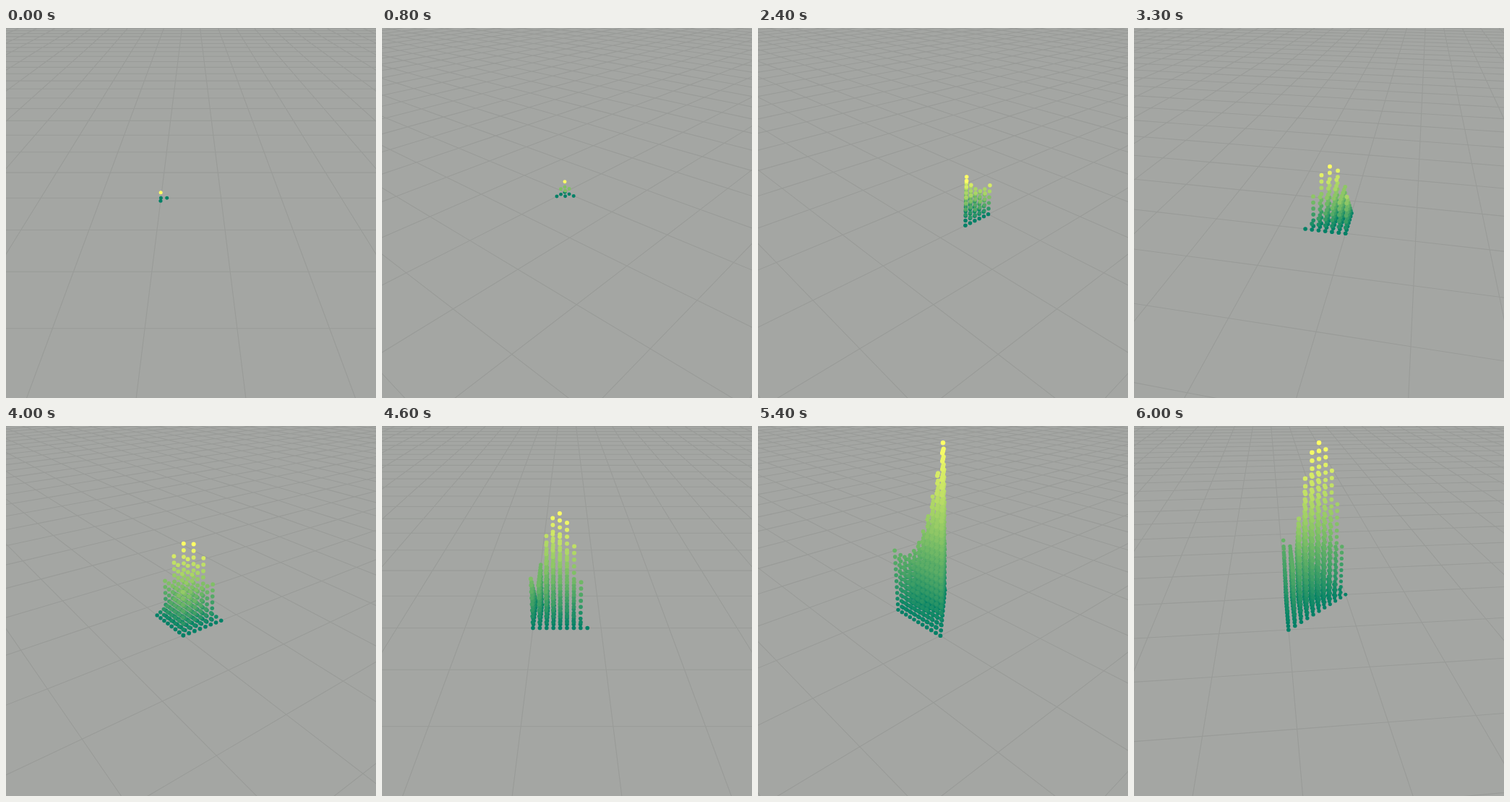
These frames come from a looping animation (512x512 px, 6.1 s). An HTML page with a canvas:

```html
<!DOCTYPE html>
<html>
<head>
<meta charset="utf-8">
<style>
  html, body { margin: 0; height: 100%; overflow: hidden; background: #a4a6a3; }
  canvas { display: block; }
</style>
</head>
<body>
<canvas id="stage" width="512" height="512"></canvas>
<script>
const ctx = document.getElementById('stage').getContext('2d');
const FOCAL = 256 / Math.tan(Math.PI / 8);  // 45 degree field of view
const DISTANCE = 7, SIN = 0.5, COS = Math.sqrt(0.75);  // camera pitched 30 degrees
const REACH = 24.5, STEP = 0.1, RADIUS = 0.03;

// Orbiting camera aimed at the centre of one grid cell.
function makeCamera(angle) {
  const c = Math.cos(angle), s = Math.sin(angle);
  return (x, y, z) => {
    const forward = y * c - x * s;
    const depth = DISTANCE + forward * COS - z * SIN;
    const scale = FOCAL / depth;
    return {
      depth, scale,
      x: 256 + (x * c + y * s) * scale,
      y: 256 - (forward * SIN + z * COS) * scale
    };
  };
}

function drawGrid(project) {
  const line = pointAt => {
    let open = false;
    for (let v = -REACH; v <= REACH; v++) {
      const p = pointAt(v);
      if (p.depth < 0.5) { open = false; continue; }
      if (open) ctx.lineTo(p.x, p.y); else ctx.moveTo(p.x, p.y);
      open = true;
    }
  };
  ctx.beginPath();
  for (let u = -REACH; u <= REACH; u++) {
    line(v => project(u, v, 0));
    line(v => project(v, u, 0));
  }
  ctx.strokeStyle = '#999b98';
  ctx.lineWidth = 1.1;
  ctx.stroke();
}

// Elements (i, j, k) that words of up to n letters reach in the Heisenberg monoid.
function drawBall(project, n) {
  const peak = Math.max(n, Math.floor(n * n / 4));
  const dots = [];
  for (let i = 0; i <= n; i++)
    for (let j = 0; i + j <= n; j++)
      for (let k = 0; k <= i * j + n - i - j; k++)
        dots.push({ ...project(i * STEP - 0.5, 0.5 - j * STEP, k * STEP), level: k / peak });
  dots.sort((a, b) => b.depth - a.depth);
  for (const d of dots) {
    ctx.fillStyle = `rgb(${255 * d.level}, ${127.5 + 127.5 * d.level}, 102)`;
    ctx.beginPath();
    ctx.arc(d.x, d.y, RADIUS * d.scale, 0, 2 * Math.PI);
    ctx.fill();
  }
}

function render() {
  const step = Math.max(0, Math.floor(performance.now() % 6100 / 100) - 1);
  const project = makeCamera(step * Math.PI / 30);
  ctx.fillStyle = '#a4a6a3';
  ctx.fillRect(0, 0, 512, 512);
  drawGrid(project);
  drawBall(project, Math.min(10, 1 + Math.floor((step + 1) / 6)));
  requestAnimationFrame(render);
}
render();
</script>
</body>
</html>
```
